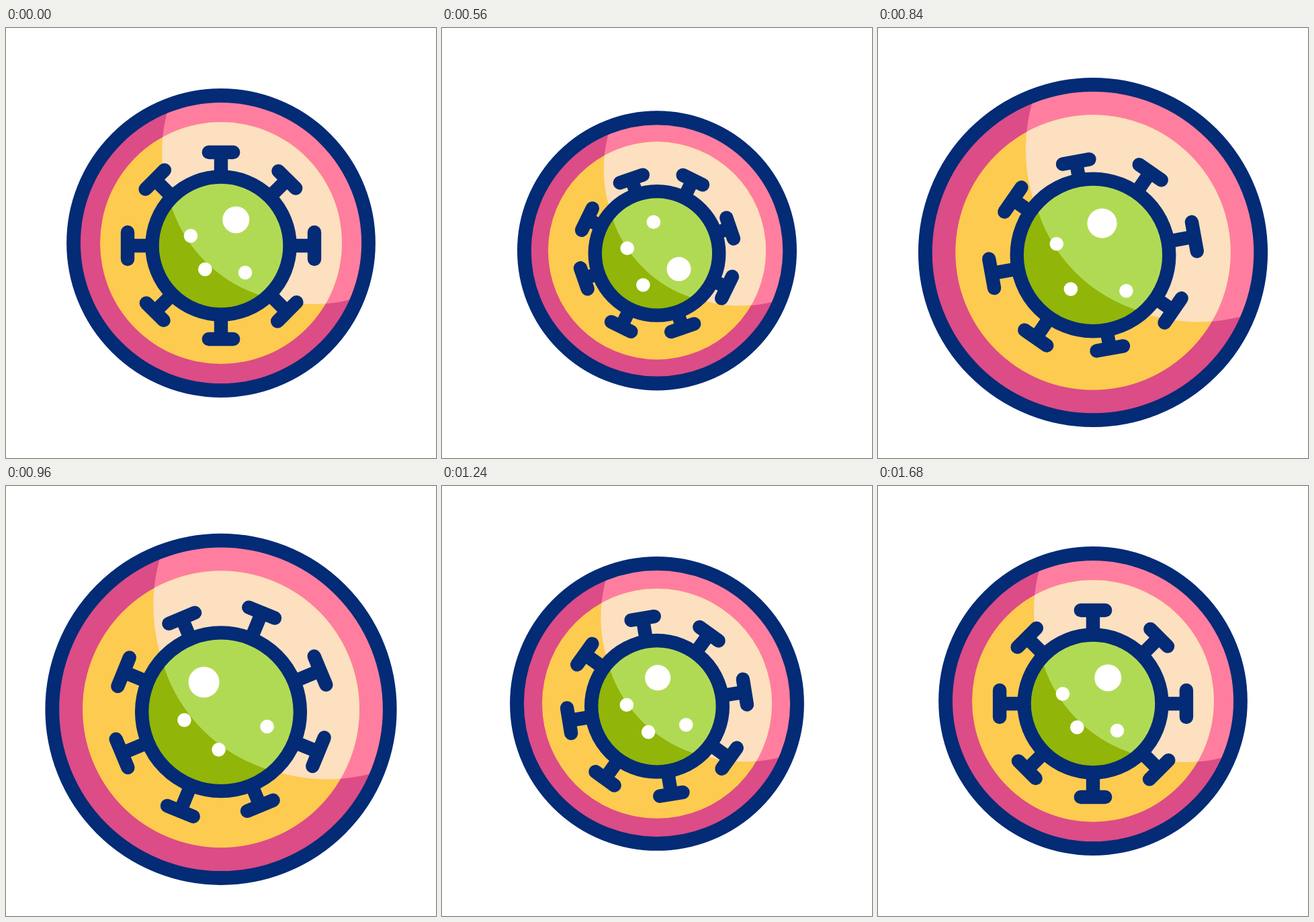
Animation, 640 px wide and 640 px high, one loop 1.72 s. Source, as an HTML page with a canvas:

```html
<!DOCTYPE html>
<html lang="en">
<head>
<meta charset="utf-8">
<title>Virus in a dish</title>
<style>
  html, body { margin: 0; width: 100%; height: 100%; overflow: hidden; background: #fff; }
  canvas { display: block; width: 640px; height: 640px; }
</style>
</head>
<body>
<canvas id="stage" width="640" height="640"></canvas>
<script>
const ctx = document.getElementById('stage').getContext('2d');
const LOOP = 1720, STEP = 40, TAU = Math.PI * 2, DEG = Math.PI / 180;
const NAVY = '#032b76', ROSE = '#dc4c86', PINK = '#ff7e9f', AMBER = '#fdcb50',
      CREAM = '#fce0bf', MOSS = '#91b508', LIME = '#b1da54', WHITE = '#fff';

const smooth = x => x * x * (3 - 2 * x);
const smoother = x => x * x * x * (10 - 15 * x + 6 * x * x);

// Eases from one value to the next, arriving at each at its time.
function glide(time, times, values, ease) {
  const next = times.findIndex(t => t > time);
  if (next === 0) return values[0];
  if (next < 0) return values[values.length - 1];
  const x = (time - times[next - 1]) / (times[next] - times[next - 1]);
  return values[next - 1] + (values[next] - values[next - 1]) * ease(x);
}

// Rises from 0 to 1 and back around its centre.
function pulse(time, centre) {
  const x = Math.min(1, Math.abs(time - centre) / 400);
  return (1 + Math.cos(Math.PI * x)) / 2;
}

const breathe = time => glide(time, [80, 540, 910, 1240, 1680], [1, .9, 1.15, .95, 1], smoother);
const drop = time => glide(time, [140, 720, 820, 1460], [0, 14, 14, 0], smooth);
const swing = (time, out, back) => glide(time, [40, 560, 980, 1440], [0, out, back, 0], smooth);

const dots = [
  { angle: 288, radius: 47.4, push: 6 },
  { angle: 214, radius: 42.4, push: 14 },
  { angle: 138, radius: 53.8, push: 12 }
];

function disc(x, y, r, color) {
  ctx.beginPath();
  ctx.arc(x, y, r, 0, TAU);
  ctx.fillStyle = color;
  ctx.fill();
}

function ring(r, width) {
  ctx.lineWidth = width;
  ctx.beginPath();
  ctx.arc(0, 0, r, 0, TAU);
  ctx.stroke();
}

// Disc whose upper right is covered by a lighter circle.
function shadedDisc(r, dark, light, glareX, glareY, glareR) {
  ctx.save();
  disc(0, 0, r, dark);
  ctx.clip();
  disc(glareX, glareY, glareR, light);
  ctx.restore();
}

function drawDish(k) {
  const glare = [138 * k, -135 * k, 226 * k];
  shadedDisc(219.5 * k, ROSE, PINK, ...glare);
  shadedDisc(180 * k, AMBER, CREAM, ...glare);
  ring(219.5 * k, 20.8);
}

// Spikes pull in with opposite ones together, the side pair first and the upright pair last.
function drawSpike(index, time, k) {
  const phase = index * 90 * DEG;
  const pullAt = 640 + 160 * Math.cos(phase) - 50 * Math.sin(phase);
  const reach = (139 - 11.5 * pulse(time, pullAt)) * k;
  const half = (index % 4 < 2 ? 18.2 : 20) * k;
  ctx.save();
  ctx.rotate((swing(time, 26, -23) + index * 45) * DEG);
  ctx.beginPath();
  ctx.moveTo(0, -100 * k);
  ctx.lineTo(0, -reach);
  ctx.moveTo(-half, -reach);
  ctx.lineTo(half, -reach);
  ctx.stroke();
  ctx.restore();
}

function drawDot(angle, distance, r) {
  disc(Math.sin(angle * DEG) * distance, -Math.cos(angle * DEG) * distance, r, WHITE);
}

function drawVirus(time, k) {
  ctx.lineWidth = 20.4;
  for (let i = 0; i < 8; i++) drawSpike(i, time, k);
  shadedDisc(102.5 * k, MOSS, LIME, 122.7 * k, -122.7 * k, 206.7 * k);
  ring(102.5 * k, 20.4);
  drawDot(30 + swing(time - 15, 96, -63), 44.5 * k, 20 * k);
  dots.forEach(({ angle, radius, push }, i) => {
    const distance = radius + push * pulse(time, 680 + 70 * i);
    drawDot(angle + swing(time - 20, 66, -33), distance * k, 10.3);
  });
}

function draw(now) {
  const time = Math.floor((now % LOOP) / STEP) * STEP;
  ctx.setTransform(1, 0, 0, 1, 0, 0);
  ctx.fillStyle = WHITE;
  ctx.fillRect(0, 0, 640, 640);
  ctx.strokeStyle = NAVY;
  ctx.lineCap = 'round';
  ctx.translate(320, 320 + drop(time));
  drawDish(breathe(time));
  ctx.translate(0, 4);
  drawVirus(time, breathe(time - 45));
  requestAnimationFrame(draw);
}

requestAnimationFrame(draw);
</script>
</body>
</html>
```
